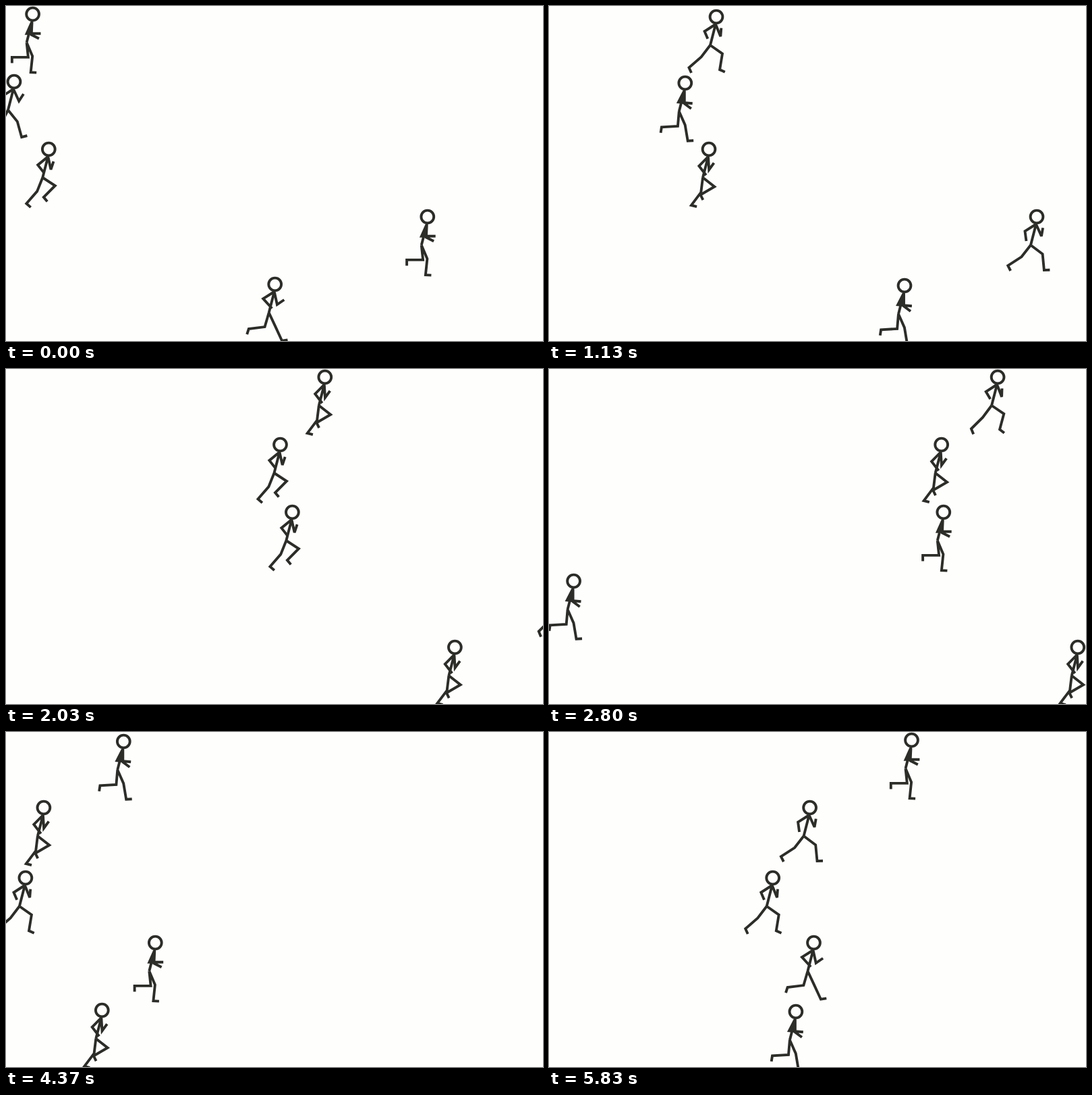
These frames come from a looping animation (796x496 px, 5890 ms). An HTML page:

```html
<!DOCTYPE html>
<html lang="en">
<head>
<meta charset="utf-8">
<title>Runners</title>
<style>
  html, body { margin: 0; width: 100%; height: 100%; overflow: hidden; background: #fefefd; }
  svg { display: block; width: 796px; height: 496px; }
  .line { fill: none; stroke: #2c2c28; stroke-width: 3.9; stroke-miterlimit: 3; }
  .torso { fill: #2c2c28; }
</style>
</head>
<body>
<svg id="stage" viewBox="0 0 796 496"></svg>
<script>
const LOOP = 5890;
const LAP = 883;      // distance until a runner re-enters on the left
const EDGE = 42;      // how far past the left edge a lap begins
const STEP = 60;      // distance covered by one step
const POSES = 11;     // poses in one step; a leg repeats after two steps
const STRIDE = 2 * POSES;

// Repeating curve through [phase, value] points
function curve(period, ...keys) {
  const [first, value] = keys[0];
  const points = [...keys, [first + period, value]];
  return phase => {
    let p = phase % period;
    if (p < first) p += period;
    const i = points.findIndex(k => k[0] > p);
    const [a, from] = points[i - 1], [b, to] = points[i];
    return from + (to - from) * (p - a) / (b - a);
  };
}

// Joint angles in degrees: 0 hangs down, positive swings forward
const thigh = curve(STRIDE, [1, 6], [2, 47], [4, 57], [8, 53], [10, 25], [12, 23], [16, -37], [19, -38]);
const shin = curve(STRIDE, [1, -90], [4, -45], [5, -15], [7, -4], [10, 25], [14, -37], [19, -57], [21, -83]);
const foot = curve(STRIDE, [1, 0], [9, 105], [14, 75], [16, 23], [20, 28], [21, -18]);
const backArm = curve(POSES, [0, -27], [1, -24], [2, -38], [5, -57], [10, -58]);
const backHand = curve(POSES, [0, 85], [1, 90], [2, 38], [4, 38], [9, 0]);
const frontArm = curve(POSES, [0, 0], [2, -5], [5, 21], [9, 25]);
const frontHand = curve(POSES, [0, 53], [1, 63], [2, 128], [5, 178], [8, 170], [10, 124]);
const bob = curve(POSES, [0, 2], [1, 0], [5, 0], [6, 4], [7, 0], [10, 0]);
const backReach = p => 16.5 + 4.5 * Math.cos(2 * Math.PI * (p - 0.5) / POSES);

// Joints of a limb made of [length, angle] bones
function limb(start, ...bones) {
  const joints = [start];
  for (const [length, angle] of bones) {
    const [x, y] = joints[joints.length - 1];
    const a = angle * Math.PI / 180;
    joints.push([x + length * Math.sin(a), y + length * Math.cos(a)]);
  }
  return joints;
}

const path = joints => "M" + joints.flat().map(n => n.toFixed(1)).join(" ");

function makePose(p) {
  const y = 12 + bob(p);
  const neck = [-1, y + 11], hip = [-9, y + 42];
  const leg = q => limb(hip, [22, thigh(q)], [24, shin(q)], [8.5, foot(q)]);
  const back = limb(neck, [19.5, backArm(p)], [backReach(p), backHand(p)]);
  const front = limb(neck, [19.5, frontArm(p)], [12.5, frontHand(p)]);
  const head = `M-9.4 ${y}a9.4 9.4 0 1 0 18.8 0a9.4 9.4 0 1 0-18.8 0z`;
  // arms close together merge with the torso
  const merged = frontArm(p) - backArm(p) < 30;
  return {
    body: head + [[neck, hip], back, front, leg(p), leg(p + POSES)].map(path).join(""),
    torso: merged ? path([neck, back[1], front[1]]) + "z" : ""
  };
}

const poses = Array.from({ length: POSES }, (_, i) => makePose(i));

const stage = document.getElementById("stage");
function add(parent, tag, cls) {
  const el = document.createElementNS("http://www.w3.org/2000/svg", tag);
  if (cls) el.setAttribute("class", cls);
  return parent.appendChild(el);
}

// x at time zero, speed in px per ms, pose at x = 0
const runners = [
  { x: -34.3, speed: 0.2498, phase: 4.4 },
  { x: -55.3, speed: 0.2275, phase: 6.55 },
  { x: 1.6, speed: 0.2083, phase: 3.65 },
  { x: 590, speed: 0.1177, phase: 7.3 },
  { x: 353.2, speed: 0.1538, phase: 2.45 }
].map(r => {
  const group = add(stage, "g");
  return { ...r, group, torso: add(group, "path", "torso"), body: add(group, "path", "line") };
});

// The picture rate drops over time: [start, pictures until the next start]
const cadence = [[0, 1], [230, 54], [2030, 16], [2800, 12], [3470, 14], [4370, 23], [LOOP, 1]];

function snap(t) {
  const i = cadence.findIndex(([start]) => start > t) - 1;
  const [start, count] = cadence[i];
  const gap = (cadence[i + 1][0] - start) / count;
  return start + gap * Math.floor((t - start) / gap + 1e-6);
}

function draw(t) {
  const time = Math.max(snap(t), 296);   // the run starts with a short hold
  runners.forEach((r, row) => {
    const way = r.x + r.speed * time;
    const x = (way + EDGE) % LAP - EDGE;
    const pose = poses[Math.round(way / STEP * POSES + r.phase) % POSES];
    r.group.setAttribute("transform", `translate(${x.toFixed(1)} ${row * 100})`);
    r.body.setAttribute("d", pose.body);
    r.torso.setAttribute("d", pose.torso);
  });
}

const begin = performance.now();
function tick() {
  draw((performance.now() - begin) % LOOP);
  requestAnimationFrame(tick);
}
tick();
</script>
</body>
</html>
```
